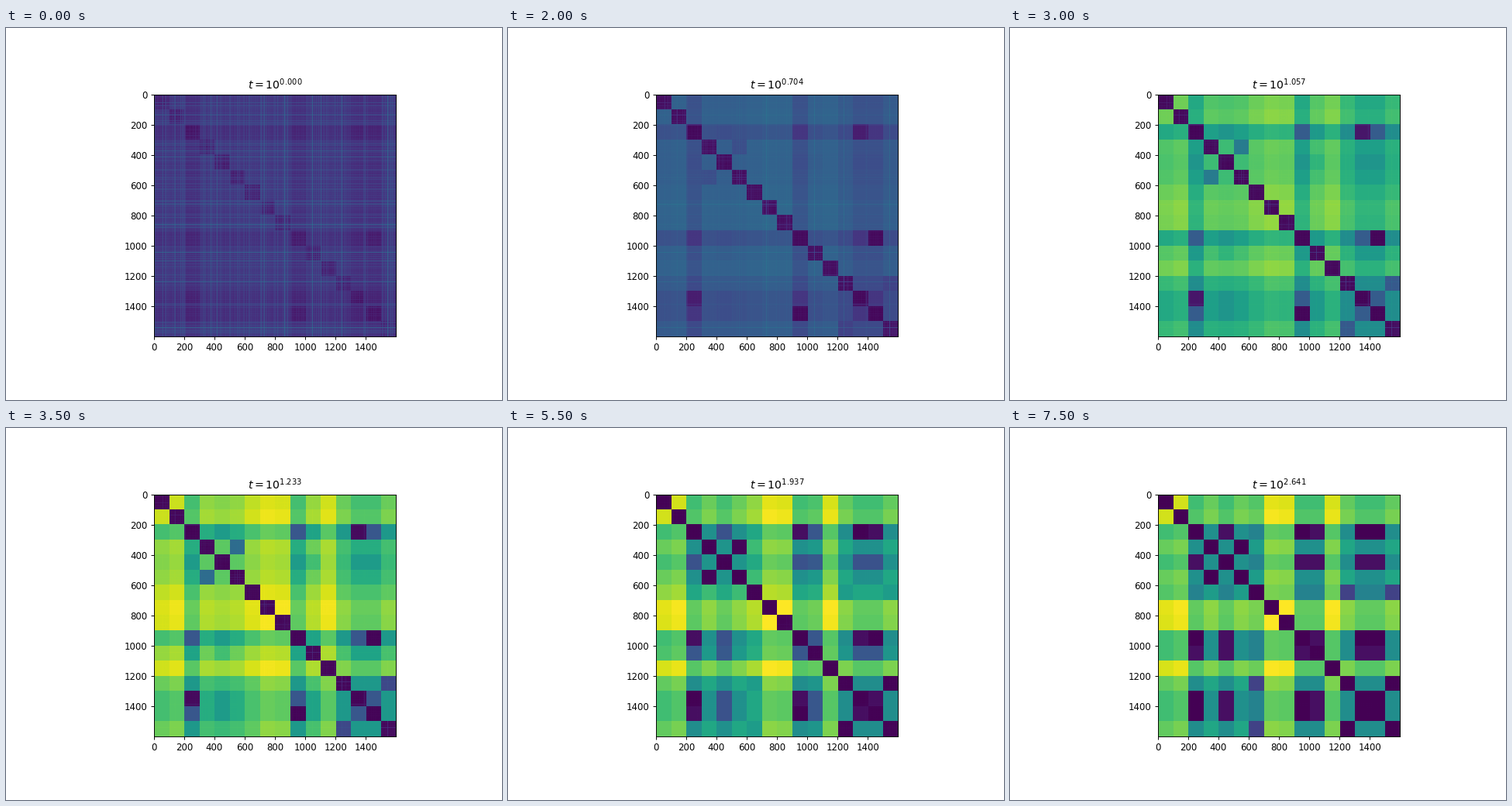
Animation of 640 by 480 pixels, one loop 8000 ms. Source, as a matplotlib script:

```python
import numpy as np
import matplotlib.pyplot as plt
from matplotlib.animation import FuncAnimation

STEPS, SIZE, CLUSTERS = 16, 100, 16
N = SIZE * CLUSTERS
RATIO = 1.5

# Squared radius of a cluster: rest + extra * exp(-t / tau)
REMOTE = {0: .41, 1: .46, 7: .51, 8: .49, 11: .475}
SETTLING = [
    ([2, 9, 13, 14], .07, .12, 10),
    ([4], .07, .40, 25),
    ([10], .07, .40, 35),
    ([3, 5], .18, .29, 20),
    ([12, 15], .17, .25, 8),
    ([6], .12, .36, 110),
]

# Clusters that melt together, slowest first, with their time constants
MERGING = [
    ([6, 12, 15], 430),
    ([2, 4, 9, 10, 13, 14], 200),
    ([2, 9, 13, 14], 38),
    ([3, 5], 22),
    ([12, 15], 16),
    ([2, 13], 6),
    ([9, 14], 1.5),
]
tau_merge = np.full((CLUSTERS, CLUSTERS), np.inf)
for ids, tau in MERGING:
    tau_merge[np.ix_(ids, ids)] = tau


def radius2(t):
    r = np.zeros(CLUSTERS)
    for i, rest in REMOTE.items():
        r[i] = rest
    for ids, rest, extra, tau in SETTLING:
        r[ids] = rest + extra * np.exp(-t / tau)
    return r


# Per-point scatter, plus a few points that lie far out
rng = np.random.default_rng(7)
level = np.repeat(radius2(1) / .47, SIZE)
grain = .010 * level * np.minimum(rng.lognormal(-.35, .85, N), 5)
streak = np.zeros(N)
for start in rng.integers(0, N - 5, 24):
    streak[start:start + 4] = .02 * rng.random()
for start in (478, 725, 1043, 1237, 1537):
    streak[start:start + 5] = .05


def cluster_distance(t):
    zoom = .13 + .87 * (1 - np.exp(-(t / 9.1) ** 2.3))
    r = radius2(t)
    d = zoom * np.sqrt(r[:, None] + r) * np.exp(-t / tau_merge)
    np.fill_diagonal(d, 0)
    return d


def distances(t):
    noise = grain * t ** -1.2 + streak * np.exp(-t / 10)
    blocks = cluster_distance(t) ** 2
    d2 = np.repeat(np.repeat(blocks, SIZE, axis=0), SIZE, axis=1)
    return np.sqrt(d2 + noise[:, None] + noise)


# Text and lines share one scale with the axes
SCALE = .847
plt.rcParams.update({
    "font.size": 10 * SCALE,
    "axes.linewidth": .8 * SCALE,
    "axes.titlepad": 6 * SCALE,
})
for axis in ("xtick", "ytick"):
    for part, points in (("size", 3.5), ("pad", 3.5), ("width", .8)):
        plt.rcParams[f"{axis}.major.{part}"] = points * SCALE

fig = plt.figure(figsize=(6.4, 4.8), dpi=100)
left, bottom, side = 190.6, 81.8, 312.6
ax = fig.add_axes([left / 640, bottom / 480, side / 640, side / 480])
image = ax.imshow(distances(1), cmap="viridis", vmin=0, vmax=1,
                  interpolation="nearest")
ticks = range(0, N, 200)
ax.set_xticks(ticks)
ax.set_yticks(ticks)
title = ax.set_title("")


def update(k):
    image.set_data(distances(RATIO ** k))
    title.set_text(r"$t = 10^{%.3f}$" % (k * np.log10(RATIO)))
    return image, title


anim = FuncAnimation(fig, update, frames=STEPS, interval=500, repeat=True)
plt.show()
```
